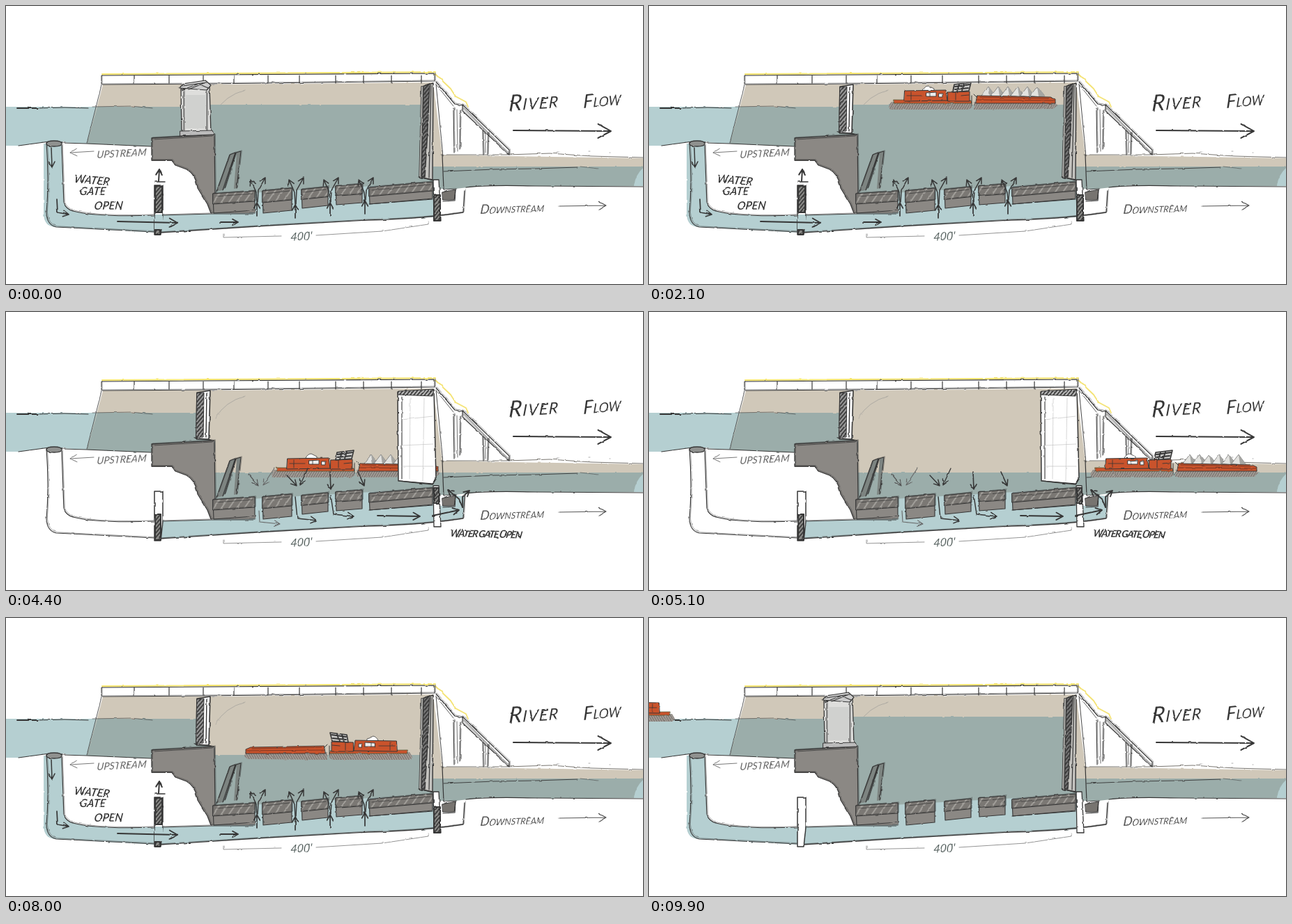
Write an HTML page that moves like this. It is 914 px wide and 400 px high and loops after 10 s.

```html
<!DOCTYPE html>
<html lang="en">
<head>
<meta charset="utf-8">
<title>How a river lock works</title>
<style>
  html, body { margin: 0; width: 100%; height: 100%; overflow: hidden; background: #fff; }
  svg { display: block; width: 914px; height: 400px; }
  text { font-family: Lato, "Open Sans", sans-serif; font-style: italic; stroke: none; }
</style>
</head>
<body>
<svg id="stage" viewBox="0 0 914 400" fill="none" stroke-linecap="round" stroke-linejoin="round"></svg>
<script>
const INK = '#363636', GRAY = '#8b8884', SAND = '#d0c8b9', POOL = '#9badaa', RIVER = '#b5cfd1', RED = '#c9532c';

const path = (d, fill = 'none', stroke = 'none', width = 1) =>
  `<path d="${d}" fill="${fill}" stroke="${stroke}" stroke-width="${width}"/>`;
const line = (d, width = 1.2, color = INK) => path(d, 'none', color, width);
const group = (id, ...parts) => `<g id="${id}">${parts.join('')}</g>`;
const shaded = (d, fill, pattern, stroke, width) => path(d, fill) + path(d, `url(#${pattern})`, stroke, width);

// Pencil look: the same line twice, the second one lighter and slightly off.
const sketch = (d, width = 1.3) =>
  line(d, width) + `<g transform="translate(1.4 -1.2)" opacity=".6">${line(d, .7)}</g>`;

const arrow = (points, head = 9, width = 1.5, color = INK) => {
  const [x0, y0, x, y] = points.slice(-4);
  const angle = Math.atan2(y - y0, x - x0);
  const barb = turn => `${x - head * Math.cos(angle + turn)} ${y - head * Math.sin(angle + turn)}`;
  return line(`M${points.join(' ')}M${barb(.5)}L${x} ${y}L${barb(-.5)}`, width, color);
};

const label = (x, y, words, size, { color = INK, turn = 0, weight = 400, caps = 'normal', gap = 0 } = {}) =>
  `<text transform="translate(${x} ${y}) rotate(${turn}) skewX(-8)" font-size="${size}" fill="${color}"
    font-weight="${weight}" font-variant="${caps}" letter-spacing="${gap}">${words}</text>`;

const hatch = (id, color, angle, step, width = 1.1) =>
  `<pattern id="${id}" width="${step}" height="${step}" patternUnits="userSpaceOnUse"
    patternTransform="rotate(${angle})">${line(`M1 0V${step}`, width, color)}</pattern>`;

const CHAMBER = 'M292 113L613 110V256L300 273V186H292Z';

const defs = `<defs>
  ${hatch('light', '#aaa7a2', 35, 9, 1.6)}${hatch('dark', INK, 40, 4, 1.8)}${hatch('hull', '#5f5a56', 30, 3)}
  <clipPath id="chamber"><path d="${CHAMBER}"/></clipPath>
  <filter id="rough" filterUnits="userSpaceOnUse" x="0" y="0" width="914" height="400" color-interpolation-filters="sRGB">
    <feTurbulence type="fractalNoise" baseFrequency=".1" numOctaves="2" seed="4"/>
    <feDisplacementMap in="SourceGraphic" scale="2.4" xChannelSelector="R" yChannelSelector="G"/>
  </filter></defs>`;

const backdrop = [
  path('M0 145H131L116 198L62 195L18 201H0Z', RIVER),
  path('M139 113L300 111V200L208 202L116 198Z', SAND),
  path('M131 145H300V200L208 202L116 198Z', POOL),
  line('M16 147H46', 1.8), line('M48 147L84 146L118 147', 1), line('M124 145L180 144L210 147', .6),
  line('M137 114L116 197', .8),
  path(CHAMBER, SAND),
  line('M301 152Q314 129 343 121', .8, '#a5a39e'),
  path('M613 110L626 214L720 216L914 219V232H613Z', SAND),
  path('M613 231H914V259H760L690 258L645 263H613Z', POOL),
  path('M914 233Q903 243 901 259H914Z', RIVER),
  line('M628 238L700 235L760 234L820 232', .9), line('M824 231L850 234', .5),
  line('M624 214L720 214L780 212L840 216L914 218', 1, '#77746f'),
  line('M660 261Q690 257 760 259L914 260', 1.2),
  line('M790 210l3 0M836 209l2 0M866 211l1 0', .8, '#999'),
].join('');

const stairs = [
  line('M616 98L638 119L645 130L660 138L663 145', 1.8, '#f4e374'),
  sketch('M617 109L644 141L655 143', 1.2), line('M618 114L642 144', .8),
  sketch('M655 142L722 207V214L655 151Z', 1.2), line('M657 147L720 211', 2, '#aaa'),
  sketch('M642 147L643 211M652 150L651 206', 1.1), line('M647 149L648 209', .7),
  sketch('M684 178L685 214M692 182L691 213', 1.1), line('M688 182V211', 1, '#777'),
].join('');

const walkway = [
  path('M137 100L615 97V108L290 113H137Z', '#fff'),
  sketch('M137 100L615 97V108L290 112L137 113Z', 1.1),
  line('M137 98L616 95', 2, '#f5e56e'),
  [184, 234, 283, 327, 376, 421, 473, 513, 553, 596].map(x => line(`M${x} 100V111`)).join(''),
].join('');

const slab = (x, top, w, bottom, tilt) => {
  const right = x + w, middle = (top + bottom) / 2 + 1;
  const upper = `M${x} ${top}L${right} ${top - tilt}V${middle - tilt}L${x} ${middle}Z`;
  return path(`M${x} ${top}L${right} ${top - tilt}V${bottom - tilt}L${x + 1} ${bottom}Z`, GRAY, INK, 1.1)
    + shaded(upper, '#7b7874', 'light') + sketch(upper, 1)
    + line(`M${x + 4} ${top + 4}L${right - 3} ${top - tilt + 4}`, .7);
};

const floor = [
  path('M209 190L299 185L300 271L357 265V298H294L289 285L275 262Q272 242 259 235L243 229L238 223H209Z', GRAY),
  sketch('M300 270L299 185L209 190V222H238L243 229L259 235Q272 242 275 262L289 285L294 298'),
  line('M212 192L296 187', .8),
  slab(297, 270, 60, 298, 4), slab(368, 266, 42, 298, 4), slab(424, 264, 38, 291, 4),
  slab(473, 259, 38, 286, 3), slab(521, 261, 91, 285, 8),
  path('M626 268L645 264L643 279H627Z', '#777470', INK),
].join('');

const pipeLines = [
  sketch('M58 197Q62 250 58 298Q59 315 72 318L212 325', 1.1), sketch('M222 326L360 317L520 308Q600 306 656 297L658 265', 1.3),
  sketch('M80 200L83 283Q86 292 96 295Q130 304 213 301', 1.2), sketch('M225 301L294 299H356', 1.1),
  line('M521 285L612 278M627 281L644 280L645 264', 1.2),
  line('M18 201L62 195M82 197L116 198L208 202', 1.2),
  path('M58 198Q58 194 69 194T80 198T69 202T58 198Z', '#8f918f', INK, 1.3),
  line('M626 214L628 264L645 263', 1.2), line('M617 112L627 216', .9),
].join('');

const ladder = path('M302 267L321 214L329 211L311 265ZM331 211L337 209L332 262L327 263Z', '#7d8481')
  + sketch('M302 267L321 214L329 211L311 265M314 262L330 211L337 209L331 262', 1.2);

const lettering = [
  label(721, 151, 'River', 32, { turn: -4, caps: 'small-caps', gap: 1.5 }),
  label(828, 147, 'Flow', 27, { turn: -6, caps: 'small-caps' }),
  arrow([728, 179, 868, 180], 21, 2),
  label(130, 219, 'UPSTREAM', 14.5, { color: '#666', turn: -3 }),
  arrow([126, 209, 92, 211], 11, 1, '#777'),
  label(680, 299, 'Downstream', 18.5, { color: '#555', turn: -2, caps: 'small-caps' }),
  arrow([793, 288, 861, 287], 12, 1.2, '#555'),
  label(408, 338, "400'", 16, { color: '#55605e', turn: -4 }),
  line('M312 328V333L350 332L395 331M445 330L540 324L606 314V309', .9, '#888'),
].join('');

const tow = [
  shaded('M4 -11L117 -10L120 -3L114 0H2L0 -4Z', '#b0a9a3', 'hull'),
  path('M7 -14L118 -13L119 -9L8 -9Z', RED, '#553', .8),
  path('M23 -27L82 -28L84 -13L22 -12Z', RED, INK),
  path('M49 -28Q52 -34 57 -34L65 -30V-28Z', '#fff', INK, .8),
  path('M54 -24L68 -25V-19H54ZM72 -23H77V-18H72Z', '#eee', INK, .9), line('M32 -25V-14M59 -24V-19M26 -20H48', .8),
  path('M85 -25L116 -26V-12H85Z', RED, INK), line('M96 -24V-14M104 -20L115 -21', .9),
  path('M94 -36L118 -39L115 -27L92 -25Z', '#c9c9c7', INK, 1.6),
  line('M95 -33L116 -36M101 -36L98 -26M108 -37L105 -27M95 -29L114 -31', 1.8),
  shaded('M122 -11L239 -12L241 -5L236 -1L122 0Z', '#b0a9a3', 'hull'),
  path('M127 -20L232 -18L239 -15V-9L125 -9Z', RED, INK, .9), line('M126 -14L238 -13M130 -18L230 -16', .8, '#6a3020'),
  line('M119 -20V-6M122 -22L127 -17', 1),
].join('');

const cargo = [0, 1, 2, 3, 4, 5].map(i => {
  const x = 133 + i * 14;
  return path(`M${x} -20L${x + 10} -33L${x + 21} -18Z`, '#e2e2df', '#777', .8) + path(`M${x + 10} -33L${x + 12} -19L${x + 21} -18Z`, '#a5a5a2');
}).join('');

const upperOpen = [
  path('M251 119L292 114L294 183H252Z', '#dededc', INK, 1.3),
  path('M258 128H286V176H258Z', '#d0d1cf'), sketch('M255 122V180M288 119V181', 1),
  path('M249 118L254 112L286 107L294 114L288 121Z', '#ccc', INK, 1.2), line('M253 115L288 110M252 121L276 112L290 118M262 120L284 111', 1.1),
  path('M250 180L296 179L298 185L250 187Z', '#bbb', INK),
].join('');

const upperShut = [
  path('M274 116L293 113L291 183H273Z', '#fff', INK, 1.6),
  shaded('M274 117L284 116L283 180H273Z', '#999', 'dark', INK, 1),
  line('M288 117L287 180M270 181L294 184', 1.4),
].join('');

const lowerShut = [
  path('M596 116L613 111L612 250L593 246Z', '#c4c3bf', INK, 1.4),
  path('M596 116L604 114L599 246L593 245Z', '#a4a4a1'),
  shaded('M599 115L608 112L605 180L601 246L596 245Z', '#777', 'dark', INK, 1.4),
  line('M610 113L607 247M592 246L613 251', 1.2),
].join('');

const lowerOpen = [
  path('M562 115L614 112L617 240L612 248L563 243Z', '#fff', INK, 1.5),
  shaded('M563 114L614 111L612 121L563 119Z', '#bbb', 'dark', INK, 1),
  line('M568 122V240M564 243L613 247', 1.1), line('M580 124L579 240M600 124L598 243M568 155L612 150M568 192L613 190M568 222L613 222', .6, '#bbb'),
].join('');

const valves = path('M213 258H225V301L222 329H213Z', '#fff', INK, 1.5) + path('M613 250H621L624 309H614Z', '#fff', INK, 1.3);
const valve = (x, y, w, h) => shaded(`M${x} ${y}h${w}v${h}h${-w}Z`, '#8d8d8a', 'dark', INK, 2);

const filling = [
  valve(214, 259, 10, 38), path('M213 300H225V321H213Z', RIVER), valve(214, 322, 7, 7), valve(614, 272, 9, 37),
  line('M214 253H228', 1.5), arrow([219, 252, 220, 235], 9, 2),
  arrow([65, 204, 66, 232], 9), arrow([73, 278, 74, 297, 90, 300], 9, 1.7),
  arrow([160, 310, 246, 312], 13, 1.8), arrow([308, 311, 333, 311], 9, 1.8),
  [[360, 302], [415, 305], [465, 302], [515, 299]].map(([x, y]) =>
    arrow([x, y, x, y - 19], 9, 1.7) + arrow([x, y - 20, x - 1, 268, x - 9, 250], 9) + arrow([x + 1, y - 20, x + 2, 265, x + 12, 247], 9)
  ).join(''),
  label(97, 254, 'WATER', 16, { turn: 5, weight: 600 }),
  label(105, 272, 'GATE', 16, { weight: 600 }),
  label(126, 293, 'OPEN', 16, { turn: -1, weight: 600 }),
].join('');

const draining = [
  valve(214, 291, 8, 37), valve(614, 253, 7, 23),
  arrow([348, 233, 362, 250], 9, 1.2, '#555'), arrow([385, 225, 369, 249], 9, 1.1, '#666'),
  arrow([403, 235, 417, 250], 9, 1.4), arrow([433, 225, 422, 249], 9, 1.3),
  arrow([465, 230, 466, 256], 9, 1.6), arrow([505, 230, 514, 250], 9, 1.6),
  arrow([363, 286, 364, 302, 393, 305], 9, 1.1, '#666'), arrow([415, 266, 418, 297, 446, 300], 10),
  arrow([466, 264, 470, 291, 499, 294], 10), arrow([533, 293, 594, 294], 11, 1.8),
  arrow([612, 293, 650, 285], 10, 1.8), arrow([655, 281, 650, 269, 634, 256], 9, 1.8), arrow([655, 281, 655, 266, 665, 257], 9, 1.8),
  label(637, 323, 'WATER GATE OPEN', 14, { turn: 1.5, weight: 700, gap: -1.2 }),
].join('');

stage.innerHTML = defs + '<g filter="url(#rough)">' + [
  backdrop,
  `<g clip-path="url(#chamber)"><rect id="pool" x="290" width="330" height="140" fill="${POOL}"/></g>`,
  ladder,
  group('pipeUp', path('M54 198H80L83 283Q86 292 96 295Q130 304 213 301L298 299V272L613 254V304L520 307L360 317L215 326L72 318Q54 318 54 298Z', RIVER)),
  group('pipeDown', path('M298 272L613 254V278L644 280L645 264L658 265L656 296Q590 307 520 307L360 317L215 326V301L298 299Z', RIVER)),
  floor, pipeLines, valves, stairs,
  group('boat', group('cargo', cargo), tow),
  walkway, lettering,
  group('upperOpen', upperOpen), group('upperShut', upperShut),
  group('lowerOpen', lowerOpen), group('lowerShut', lowerShut),
  group('filling', filling), group('draining', draining),
].join('') + '</g>';

const BOAT_X = [[0, -245], [100, -245], [200, -228], [1200, 22], [1900, 303], [2000, 303], [2100, 344], [4300, 344],
  [4400, 381], [4500, 381], [4600, 423], [5100, 633], [5600, 886], [5700, 930], [6100, 930], [6200, 900],
  [6600, 721], [7200, 391], [7300, 343], [8900, 343], [9000, 288], [9900, -203]];
const LEVELS = [[0, 142], [2700, 160], [3000, 180], [3300, 197], [3600, 222], [3900, 231],
  [7700, 222], [8000, 197], [8200, 180], [8400, 160], [8600, 142]];

const glide = (keys, t) => {
  const i = keys.findIndex(key => key[0] > t);
  if (i < 0) return keys.at(-1)[1];
  const [t0, a] = keys[i - 1], [t1, b] = keys[i];
  return a + (b - a) * (t - t0) / (t1 - t0);
};
const step = (keys, t) => keys.findLast(key => key[0] <= t)[1];
const show = (id, on) => document.getElementById(id).setAttribute('display', on ? 'inline' : 'none');

function render(t) {
  const level = step(LEVELS, t), x = glide(BOAT_X, t);
  const upper = t < 2100 || t >= 8800, lower = t >= 4100 && t < 7500;
  const fromAbove = t < 2400 || t >= 7700, returning = t >= 5900;
  document.getElementById('pool').setAttribute('y', level);
  document.getElementById('boat').setAttribute('transform',
    returning ? `translate(${x + 240} ${level + 7}) scale(-1 1)` : `translate(${x} ${level + 7})`);
  show('cargo', !returning);
  show('pipeUp', fromAbove);
  show('pipeDown', !fromAbove);
  show('upperOpen', upper);
  show('upperShut', !upper);
  show('lowerOpen', lower);
  show('lowerShut', !lower);
  show('filling', fromAbove && t < 8800);
  show('draining', t >= 2400 && t < 7200);
}

let shown = -1;
function tick() {
  const t = Math.floor(performance.now() % 10000 / 100) * 100;
  if (t !== shown) render(shown = t);
  requestAnimationFrame(tick);
}
tick();
</script>
</body>
</html>
```
